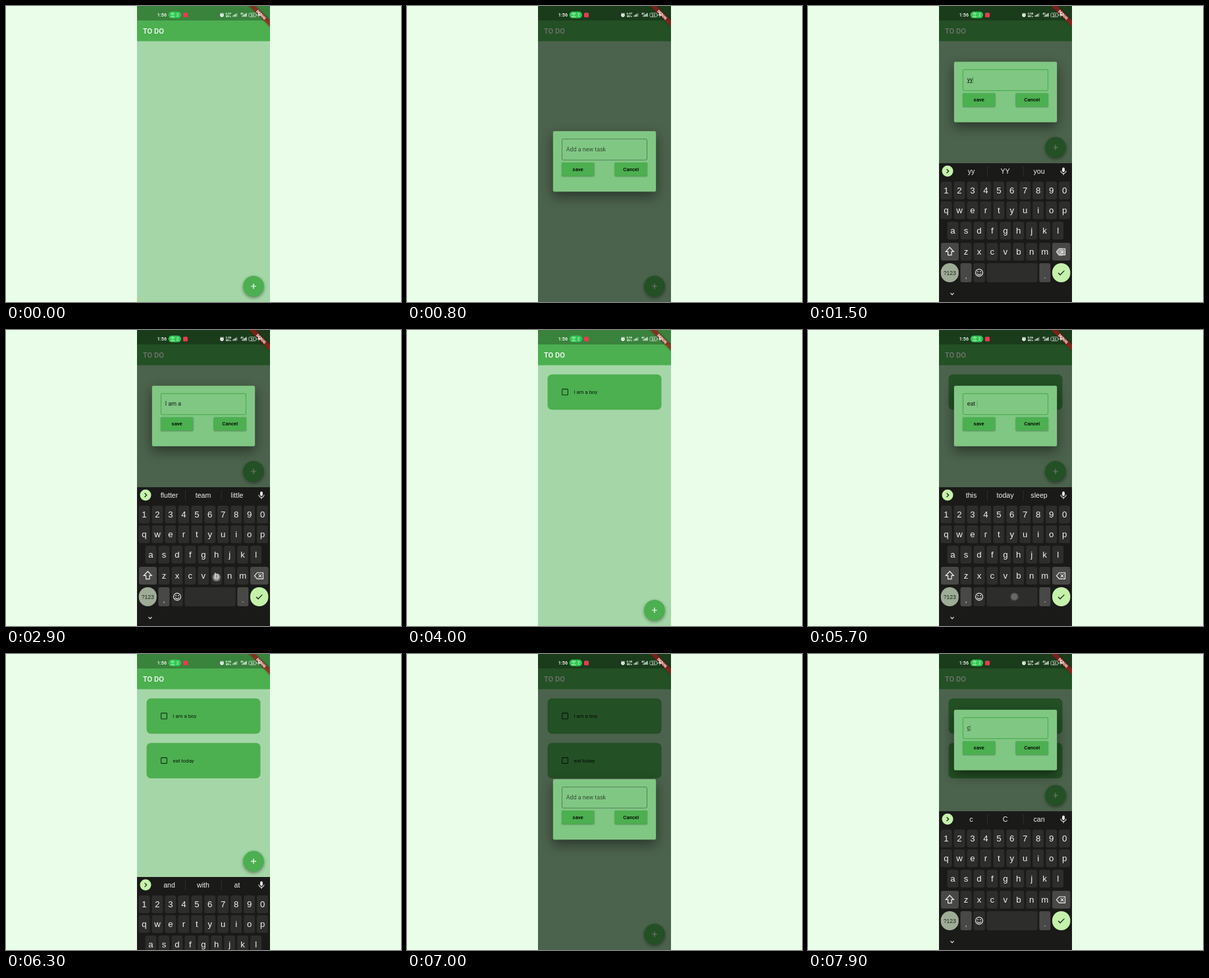
An HTML page with a canvas for the animation above (8 s loop, 600x450 px).

```html
<!DOCTYPE html>
<html lang="en">
<head>
<meta charset="utf-8">
<title>To do app</title>
<style>
  html, body { margin: 0; width: 600px; height: 450px; overflow: hidden; background: #e9fde9; }
  canvas { display: block; width: 600px; height: 450px; }
</style>
</head>
<body>
<canvas id="stage"></canvas>
<script>
const canvas = document.getElementById('stage');
const c = canvas.getContext('2d');
const ratio = window.devicePixelRatio || 1;
canvas.width = 600 * ratio;
canvas.height = 450 * ratio;

const LOOP = 8000, STEP = 100;
const GREEN = '#4caf50', KEY = '#2d2d2c', KEY_ALT = '#484847', LIME = '#c5f2ab';
const ROBOTO = 'Roboto, sans-serif', KEY_FONT = '"Liberation Sans", Arial, sans-serif';
const FAB = [376, 426], KEYBOARD_HEIGHT = 211;

// One entry per dialog; fall is how long the keyboard takes to leave
const sessions = [
  { open: 250, focus: 950, close: 3650, fall: 280, task: 'I am a boy' },
  { open: 4350, focus: 4750, close: 6150, fall: 400, task: 'eat today' },
  { open: 6880, focus: 7300, close: 9000, fall: 300 }
];

// time, field text, suggestions
const typed = [
  [0, '', 'I|the|you'],
  [1200, 'y', 'y|Y|you'], [1400, 'yy', 'yy|YY|you'], [1600, 'y', 'y|Y|you'], [1700, '', 'I|the|you'],
  [2100, 'I', "I|I'm|It"], [2200, 'I ', 'am|have|will'], [2300, 'I a', 'a|am|an'],
  [2400, 'I am', 'am|an|amazing'], [2500, 'I am ', 'a|not|the'], [2600, 'I am a', 'a|at|an'],
  [2700, 'I am a ', 'flutter|team|little'], [3000, 'I am a b', 'b|boy|big'],
  [3200, 'I am a bo', 'bo|boy|both'], [3400, 'I am a boy', 'boy|boys|Boy'],
  [4200, '', 'I|the|you'],
  [5000, 'e', 'e|E|each'], [5200, 'ea', 'ea|each|eat'], [5400, 'eat', 'eat|eating|Eat'],
  [5700, 'eat ', 'this|today|sleep'], [6000, 'eat today ', 'and|with|at'],
  [6800, '', 'I|the|you'], [7800, 'c', 'c|C|can']
];

const speeds = [[0, '6.07'], [1000, '2.00'], [3500, '0.95'], [5000, '0.06'], [6600, '0.30']];

const rows = [
  ['1234567890', 210, 267], ['qwertyuiop', 210, 297], ['asdfghjkl', 220, 328], ['zxcvbnm', 240, 360]
];
const keys = rows.flatMap(([chars, x, y]) => [...chars].map((char, i) => ({ char, x: x + i * 19.95, y })));

// Taps: open, field, save, shift, then one ahead of every text change
const taps = [[1900, 215, 376]];
for (const s of sessions) {
  taps.push([Math.round(s.open / 100) * 100 - 100, ...FAB], [s.focus - 100, 300, 113], [s.close - 50, 260, 143]);
}
taps[1][0] = 100;
typed.forEach(([time, text], i) => {
  const before = i ? typed[i - 1][1] : '';
  if (!text && before.length !== 1) return;
  const key = keys.find(k => k.char === text.slice(-1).toLowerCase());
  if (text.length < before.length) {
    if (time < 2000) taps.push([time - 100, 384, 374]);
  } else if (text.length > before.length + 2) taps.push([time - 100, 299, 252]);
  else if (key) taps.push([time - 100, key.x, key.y + 16]);
  else taps.push([time - 100, 313.5, 405.5]);
});

const ramp = (t, start, length) => Math.min(1, Math.max(0, (t - start) / length));
const easeOut = p => 1 - (1 - p) ** 2;
const latest = (list, t) => list.filter(e => e[0] <= t).pop();

function box(x, y, w, h, r, fill, stroke, weight = 1) {
  c.beginPath();
  c.roundRect(x, y, w, h, r);
  if (fill) { c.fillStyle = fill; c.fill(); }
  if (stroke) { c.strokeStyle = stroke; c.lineWidth = weight; c.stroke(); }
}
function disc(x, y, r, fill) {
  c.beginPath();
  c.arc(x, y, r, 0, 7);
  c.fillStyle = fill;
  c.fill();
}
function line(d, color, weight = 1.2) {
  c.strokeStyle = color;
  c.lineWidth = weight;
  c.stroke(new Path2D(d));
}
function label(text, x, y, size, color, { weight = 400, align = 'left', font = ROBOTO } = {}) {
  c.font = `${weight} ${size}px ${font}`;
  c.textAlign = align;
  c.fillStyle = color;
  c.fillText(text, x, y);
}
function shaded(dy, blur, alpha, draw) {
  c.save();
  c.shadowColor = `rgba(0,0,0,${alpha})`;
  c.shadowBlur = blur * ratio;
  c.shadowOffsetY = dy * ratio;
  draw();
  c.restore();
}

function drawHome(t, lift) {
  box(199, 0, 202, 450, 0, '#a5d6a7');
  box(199, 0, 202, 53.5, 0, GREEN);
  box(199, 0, 202, 22, 0, 'rgba(0,0,0,.25)');
  label('TO DO', 208, 42, 11.1, '#fff', { weight: 500 });
  sessions.filter(s => t >= s.close).forEach((s, i) => {
    const y = 67.5 + i * 67.7;
    box(213.5, y, 173, 53.7, 6.5, GREEN);
    box(235.6, y + 22.4, 8.8, 8.8, .8, null, 'rgba(0,0,0,.72)', 1.1);
    label(s.task, 253.5, y + 29.6, 7.8, 'rgba(0,0,0,.87)');
  });
  const y = FAB[1] - lift;
  shaded(2, 5, .4, () => disc(FAB[0], y, 15.8, GREEN));
  line(`M372 ${y}h8M376 ${y - 4}v8`, '#fff', 1.2);
}

function drawDialog(t, session, lift) {
  const y = 190 - lift / 2, focused = t >= session.focus;
  const [since, text] = latest(typed, t);
  shaded(7, 18, .45, () => box(221.8, y + .3, 156.4, 92, 2.2, '#81c784'));
  box(235.5, y + 12.2, 129, 32, 2.2, null, focused ? GREEN : 'rgba(0,0,0,.5)', focused ? 1.2 : .7);
  if (!text) label('Add a new task', 241.8, y + 30.6, 8.9, 'rgba(0,0,0,.6)');
  label(text, 241.8, y + 30.6, 8.9, 'rgba(0,0,0,.87)');
  const end = 241.8 + c.measureText(text).width;
  const word = text.match(/\S*$/)[0];
  if (word) box(end - c.measureText(word).width, y + 31.8, c.measureText(word).width, .7, 0, '#1b2a1c');
  if (focused && (t - since) % 400 < 200) box(end + .2, y + 22.5, .9, 10.5, 0, GREEN);
  [['save', 235], ['Cancel', 315.6]].forEach(([name, x]) => {
    shaded(.8, 2, .35, () => box(x, y + 48, 49.4, 20.4, 1.2, GREEN));
    label(name, x + 24.7, y + 60.8, 7.8, '#000', { weight: 500, align: 'center' });
  });
}

function drawKeyboard(t, lift) {
  const center = { align: 'center', font: KEY_FONT };
  const white = '#f1f1ef', dark = '#1b251a';
  c.save();
  c.translate(0, KEYBOARD_HEIGHT - lift);
  box(199, 239, 202, 211, 0, '#1a1a19');

  disc(212, 251, 8.5, LIME);
  line('M210.6 248l3 3l-3 3', dark, 1.3);
  latest(typed, t)[2].split('|').forEach((word, i) => label(word, 248 + i * 51.5, 255, 10.6, white, center));
  box(272, 244, .8, 15, 0, '#343433');
  box(326.7, 244, .8, 15, 0, '#343433');
  box(386.1, 245.5, 3.8, 7, 1.9, white);
  line('M384 250.5a4 4 0 0 0 8 0M388 254.5v2.5', white, 1.1);

  for (const { char, x, y } of keys) {
    box(x - 8.5, y, 17, 27, 3, KEY);
    label(char, x, y + 18, 13.2, white, center);
  }
  box(202, 360, 27, 27, 3, KEY_ALT);
  line('M215.3 367l-6 6.4h3.3v5.2h5.4v-5.2h3.3z', white);
  box(371, 360, 27.5, 27, 3, KEY_ALT);
  line('M377.5 373.7l4-4.7h9v9.4h-9zM383.6 371.3l4.8 4.8M388.4 371.3l-4.8 4.8', white, 1.1);

  box(201.8, 391, 27, 29, 13.5, '#9eac97');
  label('?123', 215.3, 408.5, 8.6, dark, center);
  box(231.5, 391, 17, 29, 3, KEY_ALT);
  label(',', 240, 413.5, 11, white, center);
  box(251.3, 391, 17.5, 29, 3, KEY);
  line('M265.4 405.5a5.4 5.4 0 1 1 -10.8 0a5.4 5.4 0 1 1 10.8 0M257 406.8q3 3.6 6 0', white, 1.1);
  disc(258.1, 403.8, .9, white);
  disc(261.9, 403.8, .9, white);
  box(271.3, 391, 77.5, 29, 3, KEY);
  box(351.3, 391, 17, 29, 3, KEY_ALT);
  label('.', 359.8, 413.5, 11, white, center);
  box(371, 391, 27.4, 29, 13.7, LIME);
  line('M380 405.8l3 3l6.4 -6.4', dark, 1.3);
  line('M216.5 436.3l2.5 2.5l2.5 -2.5', white, 1.2);
  c.restore();
}

function drawBanner() {
  c.save();
  c.beginPath();
  c.rect(199, 0, 202, 450);
  c.clip();
  c.translate(401, 0);
  c.rotate(Math.PI / 4);
  shaded(0, 3, .5, () => box(-23, 15.6, 46, 6.7, 0, 'rgba(183,28,28,.63)'));
  label('DEBUG', 0, 21, 5.7, '#fff', { weight: 900, align: 'center' });
  c.restore();
}

function drawBars(x, width, faint) {
  for (let i = 0; i < 4; i++) {
    const h = 1.7 + i * 1.3;
    box(x + i * width, 16.3 - h, 1.2, h, 0, i < faint ? '#fff' : 'rgba(255,255,255,.45)');
  }
}

function drawStatus(t) {
  const tiny = { weight: 700, align: 'center' };
  label('1:56', 229.8, 16.2, 7.2, '#fff', { weight: 500 });
  box(246.8, 8.6, 19.2, 10, 5, '#2fc653');
  line('M250.3 11.8q2.9 -2.2 5.8 0M251.6 13.6q1.6 -1.2 3.2 0M250.2 16.2h6', '#e8ffe9', .9);
  label('2', 260.6, 16.2, 6.6, '#e8ffe9', { align: 'center' });
  box(269, 10.2, 7, 7, 1.5, '#e93b4e');

  disc(328, 14, 2.7, '#fff');
  line('M325.3 11.8l1.4 -1.2M330.7 11.8l-1.4 -1.2', '#fff', .8);
  line('M328 12.5v1.7l1.2 .6', '#26602a', .6);
  label(latest(speeds, t)[1], 337.8, 13.4, 4.3, '#fff', tiny);
  label('KB/s', 337.8, 17, 3.7, '#fff', tiny);
  drawBars(344.4, 1.9, 3);
  label('4G', 358.5, 13.2, 3.6, '#fff', tiny);
  drawBars(358.6, 1.9, 4);
  box(368.8, 10.8, 11, 5.8, 1.6, null, '#d9e6da', .7);
  box(380.4, 12.6, .9, 2.2, .4, '#d9e6da');
  label('54', 374.3, 15.5, 4.8, '#fff', { align: 'center' });
  c.fillStyle = '#fff';
  c.fill(new Path2D('M384.6 10.2l-2.4 4h1.7l-.6 3l2.6 -4.2h-1.7z'));
}

function drawTaps(t) {
  for (const [start, x, y] of taps) {
    if (t < start || t >= start + 200) continue;
    const alpha = .6 * (1 - (t - start) / 200);
    disc(x, y, 6.3, `rgba(225,225,225,${alpha * .6})`);
    disc(x, y, 4.8, `rgba(225,225,225,${alpha * .6})`);
  }
}

function draw(t) {
  const session = sessions.filter(s => t >= s.open).pop();
  let shown = 0, lift = 0;
  if (session) {
    shown = ramp(t, session.open, 120) * (1 - ramp(t, session.close, 120));
    const rise = easeOut(ramp(t, session.focus, 250));
    lift = KEYBOARD_HEIGHT * rise * (1 - easeOut(ramp(t, session.close + 40, session.fall)));
  }
  c.setTransform(ratio, 0, 0, ratio, 0, 0);
  box(0, 0, 600, 450, 0, '#e9fde9');
  drawHome(t, lift);
  if (shown) {
    box(199, 0, 202, 450, 0, `rgba(0,0,0,${.54 * shown})`);
    c.globalAlpha = shown;
    drawDialog(t, session, lift);
    c.globalAlpha = 1;
  }
  drawBanner();
  if (lift) drawKeyboard(t, lift);
  drawStatus(t);
  drawTaps(t);
}

function tick() {
  draw(Math.floor(performance.now() % LOOP / STEP) * STEP);
  requestAnimationFrame(tick);
}
tick();
</script>
</body>
</html>
```
